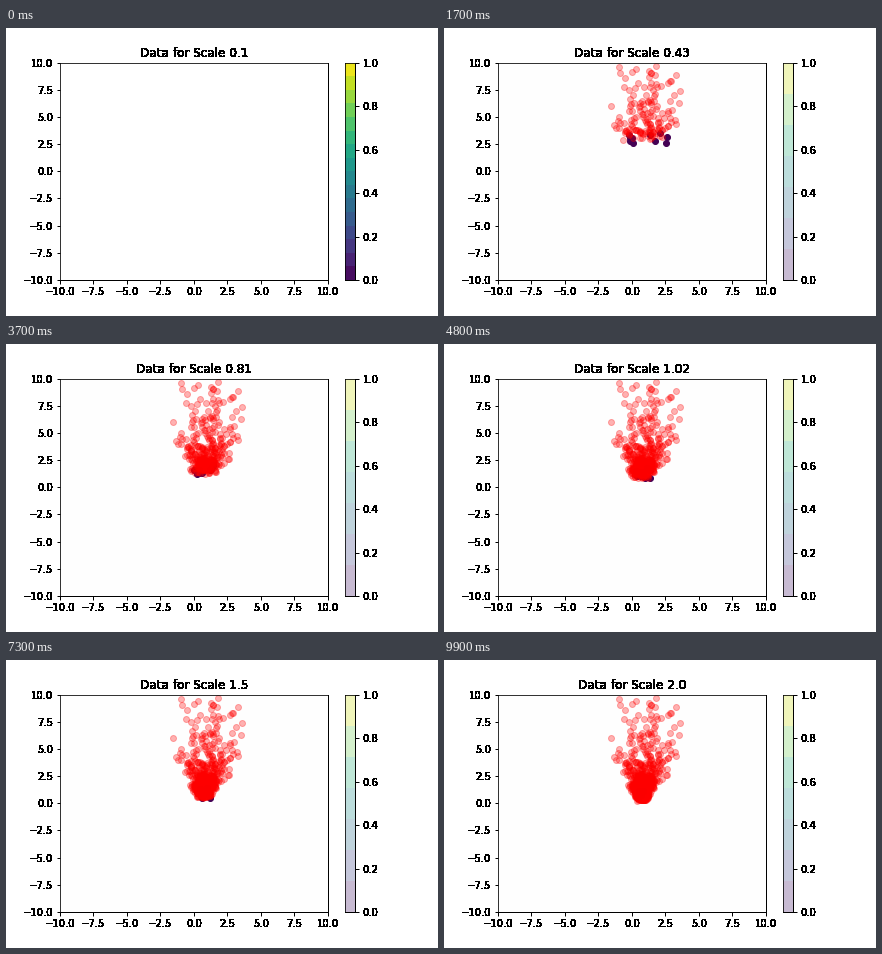
These frames come from a looping animation (432x288 px, 10000 ms). A matplotlib script:

```python
import matplotlib.pyplot as plt
import numpy as np
from matplotlib.animation import FuncAnimation

FRAMES = 100
SCALES = np.linspace(0.1, 2.0, FRAMES)
PER_STEP = 10

plt.rcParams.update({
    "font.family": "DejaVu Sans", "font.size": 10, "axes.linewidth": .8,
    "xtick.major.width": 1, "ytick.major.width": 1,
})


def sample(rng, s):
    """Points for one scale: the cloud sinks and narrows as 1 / s."""
    half = min(.85 / s, 3.2)
    x = .65 + .1 / s + half * rng.triangular(-1, 0, 1, PER_STEP)
    y = 1.29 / s - .45 + rng.uniform(0, 1, PER_STEP)
    return np.column_stack([x, y])


def harden(img, dpi):
    """Turn soft text edges into solid black."""
    out = np.zeros_like(img)
    out[..., 3] = img[..., 3] > .02
    return out, 0, 0


def bands(n, alpha):
    """Colour bar of n even steps."""
    mids = (np.arange(n) + .5) / n
    return cax.pcolormesh([0, 1], np.linspace(0, 1, n + 1), mids[:, None],
                          cmap="viridis", vmin=0, vmax=1, alpha=alpha)


rng = np.random.default_rng(7)
points = np.vstack([sample(rng, s) for s in SCALES[1:]])

fig = plt.figure(figsize=(6, 4), dpi=72, facecolor="white")
ax = fig.add_axes([.125, .125, .62, .755])
ax.set(xlim=(-10, 10), ylim=(-10, 10),
       xticks=np.arange(-10, 11, 2.5), yticks=np.arange(-10, 11, 2.5))
title = ax.set_title("", fontsize=12)

cax = fig.add_axes([.78375, .125, .02517, .755])
full, faint = bands(16, 1), bands(7, .3)
cax.set(xlim=(0, 1), ylim=(0, 1), xticks=[], yticks=np.linspace(0, 1, 6))
cax.yaxis.tick_right()

# Edges outside the white panel are solid black
for panel in (ax, cax):
    panel.spines[["right", "bottom"]].set_linewidth(1)

new = ax.scatter([], [], s=36, color=plt.cm.viridis(0.0), zorder=1)
old = ax.scatter([], [], s=36, color="red", alpha=.3, zorder=1.1)

for text in [title, *ax.get_xticklabels(), *ax.get_yticklabels(),
             *cax.get_yticklabels()]:
    text.set_agg_filter(harden)


def update(k):
    title.set_text(f"Data for Scale {round(float(SCALES[k]), 2)}")
    end = k * PER_STEP
    start = max(end - PER_STEP, 0)
    new.set_offsets(points[start:end])
    old.set_offsets(points[:start])
    full.set_visible(k == 0)
    faint.set_visible(k > 0)
    ax.set_facecolor("#fefefe" if k else "white")
    return new, old, title


anim = FuncAnimation(fig, update, frames=FRAMES, interval=100, repeat=True,
                     repeat_delay=0, blit=False)
plt.show()
```
